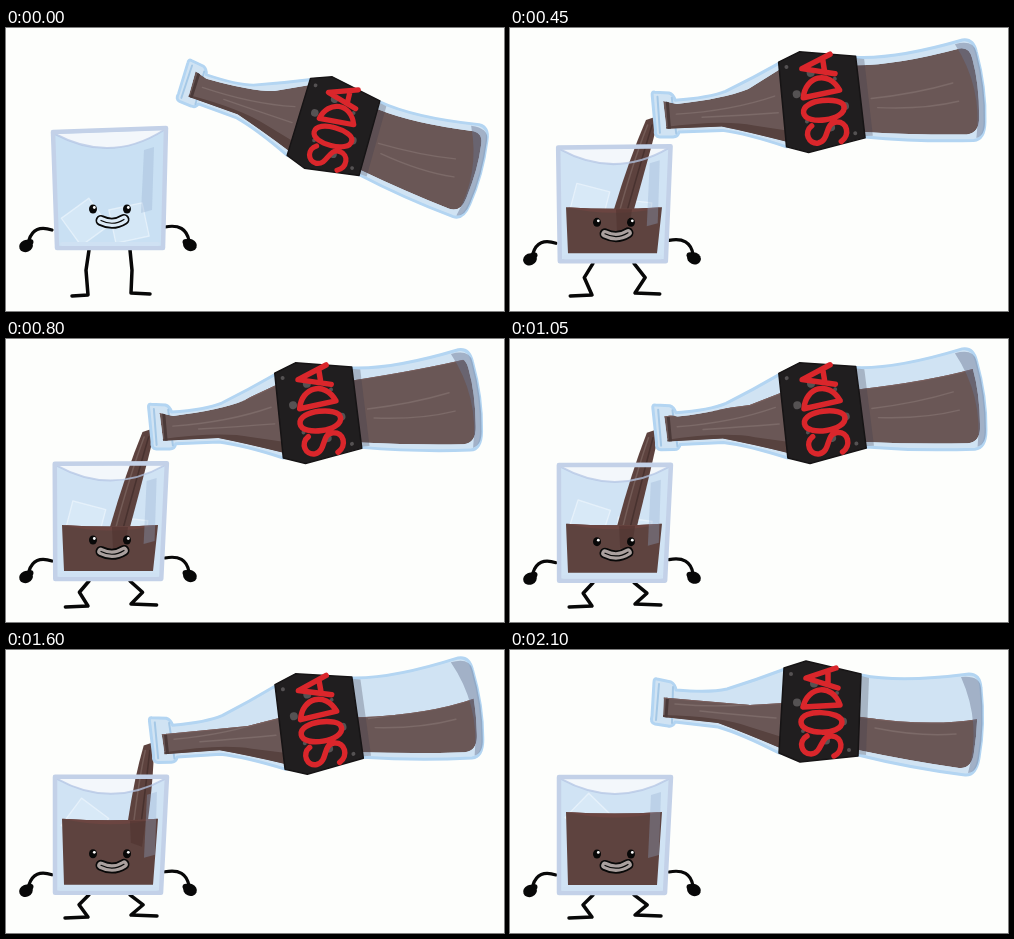
An HTML page with a canvas that plays this animation: 498x283 px, repeating every 2150 ms.

```html
<!DOCTYPE html>
<html lang="en">
<head>
<meta charset="utf-8">
<title>Soda pour</title>
<style>
html, body { margin: 0; width: 100%; height: 100%; overflow: hidden; background: #fdfefc; }
canvas { display: block; }
</style>
</head>
<body>
<canvas id="stage" width="498" height="283" role="img" aria-label="A bottle labelled SODA fills a smiling glass"></canvas>
<script>
const ctx = document.getElementById('stage').getContext('2d');
const LOOP = 2150, STEP = 50, INK = '#080808';

const lerp = (a, b, p) => a + (b - a) * p;
const ramp = (t, from, to) => Math.min(1, Math.max(0, (t - from) / (to - from)));
const smooth = (t, from, to) => { const p = ramp(t, from, to); return p * p * (3 - 2 * p); };

function paint(d, fill, stroke, width = 1) {
  const path = typeof d === 'string' ? new Path2D(d) : d;
  if (fill) { ctx.fillStyle = fill; ctx.fill(path); }
  if (stroke) { ctx.strokeStyle = stroke; ctx.lineWidth = width; ctx.stroke(path); }
}

function oval(x, y, rx, ry, fill, turn = 0) {
  const p = new Path2D();
  p.ellipse(x, y, rx, ry, turn, 0, 7);
  paint(p, fill);
}

function group(x, y, deg, draw) {
  ctx.save();
  ctx.translate(x, y);
  ctx.rotate(deg * Math.PI / 180);
  draw();
  ctx.restore();
}

// Everything that moves, as functions of the time
function pose(t) {
  const tip = Math.sin(Math.PI / 2 * ramp(t, 0, 450));
  const sag = ramp(t, 450, 1800), lift = smooth(t, 1900, 2100);
  const squash = smooth(t, 0, 200);
  const sink = 1 - Math.exp(-Math.max(0, t - 190) / 300);
  const fill = 46 * smooth(t, 250, 450) + 27 * smooth(t, 800, 2000);
  const bottom = 222 + 23 * sink;
  return {
    t, sink, fill, bottom,
    x: 186 - 32 * tip + 2 * sag - 3 * lift,
    y: 54 + 31 * tip * tip + 4 * sag - 38 * lift,
    deg: 13.5 - 22.2 * tip - 1.7 * sag + 10.4 * lift,
    size: .945 + .055 * tip,
    drain: smooth(t, 300, 1800),
    left: 102 + 5 * squash + 18 * sink,
    right: 98 + 6 * squash + 21 * sink,
    bend: 4 * squash + 3 * sink,
    surface: bottom - 10 - fill,
    flow: smooth(t, 150, 400),
    landing: 114 + 28 * (1 - smooth(t, 150, 400)) + 20 * smooth(t, 800, 1800)
  };
}

const OUTLINE = 'M147 29L161 32Q165 34 166 40Q200 43 217 39Q246 30 275 19L351 25Q390 33 459 24Q470 24 471 38Q475 75 469 108Q466 126 455 125Q400 118 348 105L269 103Q232 84 208 77L165 72Q163 77 158 76L145 74Q140 73 142 66L144 32Q144 28 147 29Z';
const INNER = 'M154 39L167 44Q215 46 240 40L275 25L351 33Q390 39 455 32Q465 32 466 44Q469 70 464 102Q462 119 449 118Q400 111 348 100L270 98Q235 83 208 73L153 67Z';
const LABEL = 'M274 18L296 11L351 24L348 106L290 112L269 103Z';
const LETTERS = 'M21-15C16-24 3-21 3-11C4 1 22-2 21 10C20 21 6 22 1 12'
  + 'M35-21C49-21 46 20 35 20C21 20 22-21 35-21Z'
  + 'M50-19L52 18C74 10 71-14 50-19Z'
  + 'M69 16L79-16L89 14M73 6H86';

function bottleLiquid(drain) {
  const top = `M148 ${lerp(36, 47, drain)}L240 ${lerp(34, 55, drain)}L273 ${lerp(22, 53, drain)}`
    + `L351 ${lerp(27, 67, drain)}Q420 ${lerp(24, 77, drain)} 468 ${lerp(22, 69, drain)}`;
  ctx.save();
  ctx.clip(new Path2D(INNER));
  ctx.clip(new Path2D(top + 'V130H148Z'));
  paint(INNER, '#6a5756');
  paint('M148 65Q210 66 240 77L275 88V110L148 80Z', '#57423f');
  paint('M165 54Q220 59 265 51M190 61Q230 65 266 68M360 68Q405 70 443 65M365 78Q410 87 446 84', null, '#7c6a68', 1.4);
  paint('M158 40L156 68', null, '#4b3a39', 3);
  paint(top, null, '#7a5f5d', 2);
  ctx.restore();
}

function bottle({ x, y, deg, size, drain }) {
  group(x, y, deg, () => {
    ctx.scale(size, size);
    ctx.translate(-153, -51);
    paint(OUTLINE, '#d0e3f3', '#b3d5f2', 3);
    paint('M149 34L146 70M163 37L162 73', null, '#a5c8e6', 2);
    bottleLiquid(drain);
    paint('M451 27Q472 74 458 123Q467 122 469 108Q475 75 471 38Q470 25 451 27Z', 'rgba(105,115,145,.45)');
    paint('M351 26L359 28L356 105L348 104Z', 'rgba(60,60,75,.28)');
    paint(LABEL, '#201e1f', '#161415', 1.5);
    for (let i = 0; i < 9; i++) oval(281 + i * 23 % 63, 24 + i * 9.5, 2 + i * 2 % 4, 2 + i * 2 % 4, '#555253');
    group(312, 107, -90, () => paint(LETTERS, null, '#da262b', 5.5));
  });
}

function stream({ t, x, y, flow, landing, surface }) {
  if (t < 150 || t >= 2000) return;
  const w = 5 + 5 * flow;
  const end = lerp(y, surface + 2, ramp(t, 150, 220));
  const top = lerp(y + 4, end, smooth(t, 1900, 2000)), sx = x - 12 - 2 * flow;
  const mx = lerp(sx, landing, .45), my = lerp(top, end, .45);
  ctx.save();
  ctx.globalAlpha = .4 + .6 * flow;
  paint(`M${sx - 4} ${top + 3}L${sx + 5} ${top}L${sx + 6} ${top + 12}Q${mx + w} ${my} ${landing + w} ${end}H${landing - w}Q${mx - w + 1} ${my} ${sx - 4} ${top + 3}Z`,
    flow < .5 ? '#5d5d68' : '#5d423e');
  for (const s of [-.4, .35])
    paint(`M${sx + s * 6} ${top + 8}Q${mx + s * w} ${my} ${landing + s * w} ${end}`, null, s < 0 ? '#745c57' : '#48322f', 1.5);
  ctx.restore();
}

function ice(x, y, deg) {
  group(x, y, deg, () => paint('M-17-17H17V17H-17Z', 'rgba(235,244,252,.3)', 'rgba(240,247,254,.65)', 1.3));
}

function limbs({ bottom: b, bend }) {
  const knee = lerp(b, 267, .45);
  paint(`M83 ${b}L${80 - bend} ${knee}L82 267L${66 - bend} 268`, null, INK, 3.5);
  paint(`M124 ${b}L${126 + 1.6 * bend} ${knee}L125 265L${144 + bend} 266`, null, INK, 3.5);
  group(0, b - 245, 0, () => {
    paint('M46 225Q28 219 23 235M159 222Q180 218 183 236', null, INK, 3.2);
    oval(20, 241, 7, 6, INK, -.4);
    oval(24, 237, 3.5, 3, INK);
    oval(184, 240, 7, 6, INK, .4);
    oval(180, 237, 3.5, 3, INK);
  });
}

function face(b, lips) {
  group(0, b - 245, 0, () => {
    for (const x of [87, 121]) {
      oval(x, 204, 4, 4.5, INK);
      oval(x + 1.3, 202.5, 1.4, 1.4, '#fff');
    }
    const smile = 'M95 215.5Q107 221.5 118 214.5';
    paint(smile, null, INK, 11);
    paint(smile, null, lips, 7.5);
    paint(smile, null, INK, 1.2);
  });
}

function glassLiquid({ t, fill, bottom, surface: y, landing: x }) {
  if (!fill) return;
  const rim = `M56 ${y}Q105 ${y + 3} 152 ${y}`;
  paint(rim + `L147 ${bottom - 10}H58Z`, '#5e433f');
  paint(rim + `Q105 ${y + 11} 56 ${y}Z`, '#6b4541');
  if (t < 2000) paint(`M${x - 8} ${y + 2}H${x + 8}L${x + 4} ${y + 28}L${x - 7} ${y + 24}Z`, 'rgba(75,48,44,.5)');
}

function glass(p) {
  const { left, right, bottom: b, sink, fill } = p;
  const lx = 47 + 2 * sink, rx = 160 + sink, bl = 51 - 2 * sink, br = 157 - 2 * sink;
  const body = `M${lx} ${left + 2}L${rx} ${right + 2}L${br} ${b - 2}H${bl}Z`;
  const rim = `M${lx + 2} ${left + 4}Q105 ${left + 34} ${rx - 2} ${right + 4}`;
  limbs(p);
  paint(body, sink < .3 ? '#c9e0f3' : '#d0e3f4');
  paint(rim + 'Z', '#f3f7fb');
  ice(79, b - 28 - fill * .68, -36 + fill * 1.1);
  ice(123, b - 27 - fill * .4, -12 + fill * .4);
  stream(p);
  glassLiquid(p);
  group(3 * sink, b, 0, () => paint('M138-100L148-103L146-40L135-37Z', 'rgba(145,172,205,.32)'));
  paint(rim, null, 'rgba(180,198,228,.75)', 2);
  paint(body, null, '#c3d1e8', 4.5);
  paint(`M${bl + 5} ${b - 6}H${br - 5}`, null, '#cfe1f3', 4);
  face(b, fill ? '#aaa09e' : '#dcebf7');
}

function frame(now) {
  const p = pose(Math.floor(now % LOOP / STEP) * STEP);
  ctx.fillStyle = '#fdfefc';
  ctx.fillRect(0, 0, 498, 283);
  ctx.lineCap = ctx.lineJoin = 'round';
  glass(p);
  bottle(p);
}

const start = performance.now();
function tick() {
  frame(performance.now() - start);
  requestAnimationFrame(tick);
}
tick();
</script>
</body>
</html>
```
